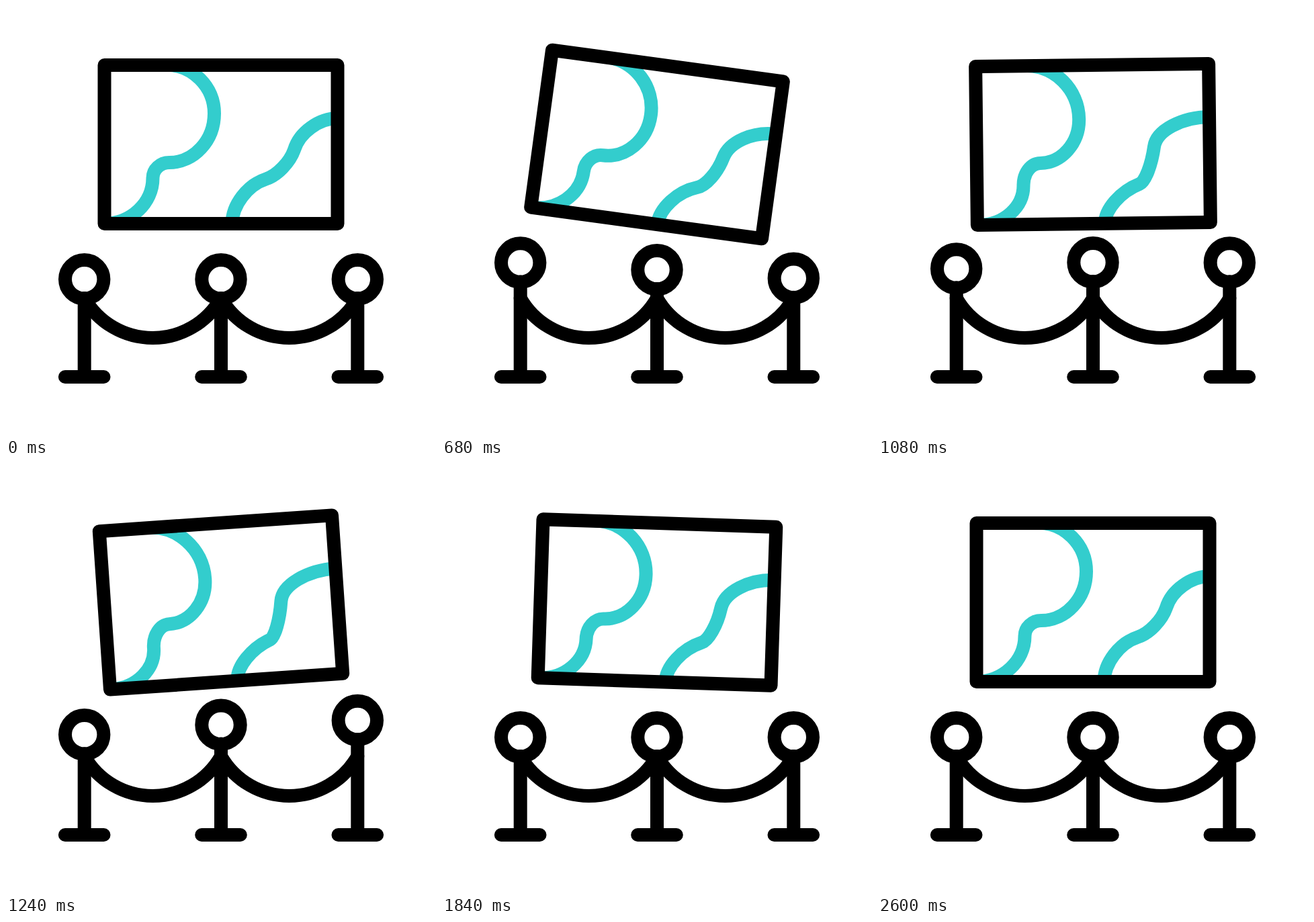
Write an HTML page that moves like this. It is 640 by 640 pixels and loops after 2680 ms.

```html
<!DOCTYPE html>
<html lang="en">
<head>
<meta charset="utf-8">
<title>Museum exhibit</title>
<style>
  html, body { margin: 0; width: 100%; height: 100%; overflow: hidden; background: #fff; }
  svg { display: block; width: 100%; height: 100%; }
</style>
</head>
<body>
<svg viewBox="0 0 640 640" fill="none" stroke="#000" stroke-width="20" stroke-linecap="round" stroke-linejoin="round">
  <clipPath id="canvas"><rect x="146.5" y="88" width="347" height="236"/></clipPath>
  <g id="painting">
    <g clip-path="url(#canvas)" stroke="#33cdcd">
      <path id="leftWave"/>
      <path id="rightWave"/>
    </g>
    <rect x="146.5" y="88" width="347" height="236"/>
  </g>
  <path d="M116.7 435A117 117 0 0 0 320 435A117 117 0 0 0 523.3 435"/>
  <g id="posts"></g>
</svg>
<script>
const LOOP = 2680, STEP = 40;
const postX = i => 320 + (i - 1) * 203.3;
const [painting, leftWave, rightWave, posts] =
  ['painting', 'leftWave', 'rightWave', 'posts'].map(id => document.getElementById(id));

for (let i = 0; i < 3; i++) {
  posts.innerHTML += `<g><path d="M${postX(i) - 28.8} 552h57.6"/>
    <path class="pole"/><circle cx="${postX(i)}" cy="406.8" r="28.7"/></g>`;
}

// Eases in and out while s goes from 0 to 1, and holds outside that range.
function ease(s) {
  s = Math.min(1, Math.max(0, s));
  const a = s ** 1.74, b = (1 - s) ** 1.74;
  return a / (a + b);
}

const ramp = (t, from, to) => ease((t - from) / (to - from));

const tiltAt = t => 8 * ramp(t, 110, 760) - 12 * ramp(t, 760, 1265)
  + 6 * ramp(t, 1265, 1900) - 2 * ramp(t, 1900, 2580);
const bendAt = t => ease(1 - Math.abs(t - 1350) / 1240);
const liftAt = (t, i) => 25.3 * ease((598 - Math.abs(t - 792 - 197 * i)) / 540);

// Points alternate between joints on the curve and the corners rounded off between them.
function roundedPath(points) {
  const toward = (p, q) => p.map((v, axis) => v + (q[axis] - v) * 0.55);
  let d = `M${points[0]}`;
  for (let i = 2; i < points.length; i += 2) {
    const [from, corner, to] = points.slice(i - 2, i + 1);
    d += `C${toward(from, corner)},${toward(to, corner)},${to}`;
  }
  return d;
}

function leftPoints(k) {
  const top = 87.5, middle = 233, bottom = 324;
  const right = 310 - 11.5 * k, left = 218.5 - 3 * k;
  return [
    [238 - 20 * k, top], [right, top], [right, 160 + 9 * k], [right, middle],
    [243 - 2 * k, middle], [left, middle], [left, 256 + 11 * k], [left, bottom],
    [146 + 4 * k, bottom]
  ];
}

const rightPoints = k => [
  [494, 167], [443 - 28 * k, 167], [429 - 20 * k, 214 - 4 * k],
  [417 - 15 * k, 248 + 13 * k], [387 + 2 * k, 257.5 + 9 * k],
  [336.5, 274 + 13 * k], [336.5, 324]
];

function draw(t) {
  const bend = bendAt(t);
  painting.setAttribute('transform', `rotate(${tiltAt(t)} 320 206)`);
  leftWave.setAttribute('d', roundedPath(leftPoints(bend)));
  rightWave.setAttribute('d', roundedPath(rightPoints(bend)));
  [...posts.children].forEach((post, i) => {
    const lift = liftAt(t, i);
    post.querySelector('.pole').setAttribute('d', `M${postX(i)} ${435.2 - lift}V552`);
    post.querySelector('circle').setAttribute('transform', `translate(0 ${-lift})`);
  });
}

const start = performance.now();
function tick() {
  const t = (performance.now() - start) % LOOP;
  draw(Math.floor(t / STEP) * STEP);
  requestAnimationFrame(tick);
}
tick();
</script>
</body>
</html>
```
